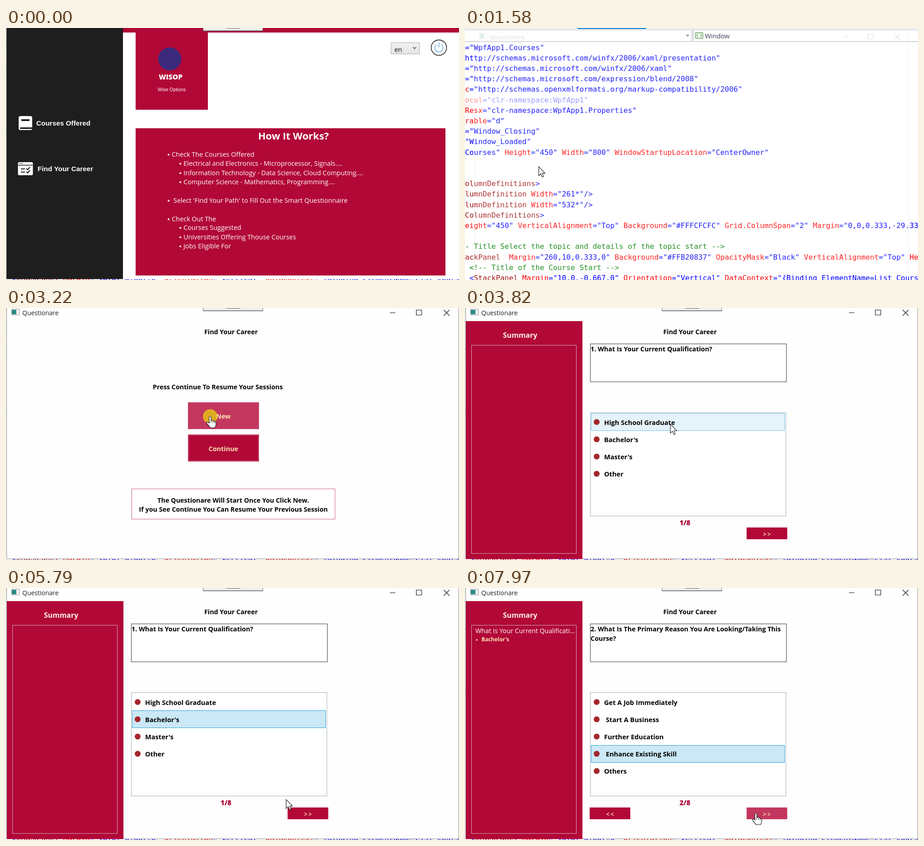
These frames come from a looping animation (1003 by 558 pixels, 8000 ms). An HTML page with a canvas:

```html
<!DOCTYPE html>
<html lang="en">
<head>
<meta charset="utf-8">
<title>Career questionnaire</title>
<style>
html, body { margin: 0; width: 100%; height: 100%; overflow: hidden; background: #fff; }
canvas { display: block; }
</style>
</head>
<body>
<canvas id="stage" width="1003" height="558"></canvas>
<script>
const ctx = document.getElementById('stage').getContext('2d');
const LOOP = 8000;
const RED = '#b20837', HOVER_RED = '#c3375f', WHEAT = '#f9e3b4', INK = '#000';
const SANS = '"Open Sans", "Noto Sans", sans-serif';
const ARIAL = '"Liberation Sans", sans-serif';
const MONO = '"DejaVu Sans Mono", monospace';

// Scene changes
const HOME_END = 1300, OPEN_START = 1520, OPEN_END = 1760, QUIZ_START = 3260;
const PICK_1 = 4800, PAGE_2 = 6210, PICK_2 = 7000;
const CLICKS = [3170, 4440, 6060, 6900], CLICK_MS = 130;

// Pointer path: time, x, y
const PATH = [
  [250, 786, 496], [380, 384, 396], [590, 384, 396], [990, 80, 306], [1450, 80, 306],
  [1580, 163, 307], [2110, 290, 304], [2250, 323, 297], [2510, 452, 240], [3790, 452, 240],
  [3820, 455, 257], [4090, 403, 285], [4410, 403, 285], [4440, 403, 293], [5160, 403, 293],
  [5430, 600, 442], [5760, 600, 442], [5790, 620, 468], [5900, 650, 500], [6490, 650, 500],
  [6850, 480, 362], [7280, 480, 362], [7970, 644, 499]
];

const CODE = [
  '="WpfApp1.Courses"',
  'http://schemas.microsoft.com/winfx/2006/xaml/presentation"',
  '="http://schemas.microsoft.com/winfx/2006/xaml"',
  '="http://schemas.microsoft.com/expression/blend/2008"',
  'c="http://schemas.openxmlformats.org/markup-compatibility/2006"',
  'ocal="clr-namespace:WpfApp1"',
  'Resx="clr-namespace:WpfApp1.Properties"',
  'rable="d"',
  '="Window_Closing"',
  '"Window_Loaded"',
  'Courses" Height="450" Width="800" WindowStartupLocation="CenterOwner"',
  '', '',
  'olumnDefinitions>',
  'lumnDefinition Width="261*"/>',
  'lumnDefinition Width="532*"/>',
  'ColumnDefinitions>',
  'eight="450" VerticalAlignment="Top" Background="#FFFCFCFC" Grid.ColumnSpan="2" Margin="0,0,0.333,-29.333"',
  '',
  '- Title Select the topic and details of the topic start -->',
  'ackPanel  Margin="260,10,0.333,0" Background="#FFB20837" OpacityMask="Black" VerticalAlignment="Top" Height=',
  ' <!-- Title of the Course Start -->',
  ' <StackPanel Margin="10.0.-0.667.0" Orientation="Vertical" DataContext="{Binding ElementName=List_Courses}"'
];
const UNUSED_LINE = 5;

// Baseline, indent, text
const STEPS = [
  [285, 0, 'Check The Courses Offered'],
  [305, 26, 'Electrical and Electronics - Microprocessor, Signals....'],
  [326, 26, 'Information Technology - Data Science, Cloud Computing....'],
  [346, 26, 'Computer Science - Mathematics, Programming....'],
  [387, 0, " Select 'Find Your Path' to Fill Out the Smart Questionnaire"],
  [428, 0, 'Check Out The'],
  [447, 26, 'Courses Suggested'],
  [468, 26, 'Universities Offering Thouse Courses'],
  [488, 26, 'Jobs Eligible For']
];

const QUIZ = [
  { lines: ['1. What Is Your Current Qualification?'],
    options: ['High School Graduate', "Bachelor's", "Master's", 'Other'] },
  { lines: ['2. What Is The Primary Reason You Are Looking/Taking This', 'Course?'],
    options: ['Get A Job Immediately', ' Start A Business', 'Further Education', ' Enhance Existing Skill', 'Others'] }
];

const ARROW = new Path2D('M0 0V20L4.6 15.8L7.8 23.2L10.8 21.8L7.8 14.6H14Z');
const HAND = new Path2D('M-2 1Q0-2 2 1V9Q5 7 6.5 10Q9 8.5 10 11.5Q13 11 13 14V18Q12.5 21 10.5 25H0Q-2 21-7 16Q-9 12-5 12.5L-2 15Z');

function text(str, x, y, size, color, weight = 400, align = 'left', family = SANS) {
  ctx.font = `${weight} ${size}px ${family}`;
  ctx.textAlign = align;
  ctx.fillStyle = color;
  ctx.fillText(str, x, y);
}

function box(x, y, w, h, fill, stroke) {
  if (fill) { ctx.fillStyle = fill; ctx.fillRect(x, y, w, h); }
  if (stroke) {
    ctx.strokeStyle = stroke;
    ctx.lineWidth = 1;
    ctx.strokeRect(x + .5, y + .5, w - 1, h - 1);
  }
}

function dot(x, y, r, color) {
  ctx.fillStyle = color;
  ctx.beginPath();
  ctx.arc(x, y, r, 0, 7);
  ctx.fill();
}

function stroke(d, color, width = 1) {
  ctx.strokeStyle = color;
  ctx.lineWidth = width;
  ctx.stroke(new Path2D(d));
}

function pill(x, y, w, h, r, color) {
  ctx.fillStyle = color;
  ctx.beginPath();
  ctx.roundRect(x, y, w, h, r);
  ctx.fill();
}

const inside = (p, x, y, w, h) => p.x >= x && p.x < x + w && p.y >= y && p.y < y + h;

function pointerAt(t) {
  const i = PATH.findIndex(key => key[0] > t);
  if (i < 0) { const [, x, y] = PATH[PATH.length - 1]; return { x, y }; }
  if (i === 0) return { x: -99, y: -99 };
  const [t0, x0, y0] = PATH[i - 1], [t1, x1, y1] = PATH[i];
  const k = (t - t0) / (t1 - t0);
  return { x: x0 + (x1 - x0) * k, y: y0 + (y1 - y0) * k };
}

function codeLine(line, y) {
  let x = 0;
  const put = (str, color) => {
    text(str, x, y, 16.2, color, 400, 'left', MONO);
    x += ctx.measureText(str).width;
  };
  if (/^\s*(<!)?-/.test(line)) return put(line, '#008000');
  const parts = line.split('"');
  const startsQuoted = parts.length % 2 === 0;
  parts.forEach((part, i) => {
    if (i) put('"', '#00f');
    if ((i % 2 === 1) !== startsQuoted) return put(part, '#00f');
    for (const [token] of part.matchAll(/[\w.]+=?|[^\w.]+/g)) {
      if (token.endsWith('=') && token.length > 1) {
        put(token.slice(0, -1), '#f00');
        put('=', '#00f');
      } else put(token, /\w/.test(token) ? '#a31515' : '#00f');
    }
  });
}

function drawEditor() {
  box(0, 0, 1003, 558, '#fff');
  box(0, 0, 1003, 5, '#eeeef2');
  box(249, 0, 152, 2, '#007acc');
  box(0, 4, 1003, 1, '#cccedb');
  box(0, 29, 1003, 2, '#cccedb');
  box(501, 4, 6, 27, '#d9dae3');
  ctx.fillStyle = '#717171';
  ctx.fill(new Path2D('M489 15H497L493 19Z'));
  stroke('M510.5 10.5H526.5V22.5H510.5ZM516 13.5L513 16.5L516 19.5M521 13.5L524 16.5L521 19.5', '#388a34', 1.4);
  text('Window', 531, 23, 14.6, '#1e1e3c');
  CODE.forEach((line, i) => {
    ctx.globalAlpha = i === UNUSED_LINE ? .45 : 1;
    codeLine(line, 48.5 + i * 23.2);
  });
  ctx.globalAlpha = 1;
}

function drawDebugBar() {
  box(436, -5, 133, 12, '#f0f0f0', '#666');
  box(437, 5, 131, 1, '#999');
  box(488, 0, 31, 1, '#555');
}

function drawHome() {
  box(1, 0, 1002, 556, '#fff');
  box(1, 0, 258, 556, '#1e1e1e');
  box(259, 0, 744, 10, RED);
  box(287, 10, 160, 171, RED);
  dot(362.5, 68.5, 25.5, '#3b2a7c');
  text('WISOP', 364.5, 114, 15.5, '#fff', 800, 'center');
  text('Wise Options', 367, 139.5, 10.4, '#fff', 400, 'center', ARIAL);

  // Book and checklist icons
  pill(28, 195, 30, 31, 4, '#fff');
  box(34, 202, 18, 4, '#1e1e1e');
  pill(31, 220, 28, 3.5, 1.5, '#1e1e1e');
  text('Courses Offered', 67, 216, 15.3, '#fff', 700, 'left', ARIAL);
  pill(26.5, 297, 33, 29, 3, '#fff');
  box(27, 303, 32, 1.5, '#1e1e1e');
  [30, 33, 36].forEach(x => dot(x, 300, 1, '#1e1e1e'));
  stroke('M33 312H42M33 319H42M45 311L48 314L53 308M45 318L48 321L53 315', '#1e1e1e', 2);
  text('Find Your Career', 70, 316.5, 15.3, '#fff', 700, 'left', ARIAL);

  const grey = ctx.createLinearGradient(0, 33, 0, 58);
  grey.addColorStop(0, '#f0f0f0');
  grey.addColorStop(1, '#e5e5e5');
  box(852, 32, 64, 26, grey, '#acacac');
  text('en', 860, 53, 14.4, '#111');
  stroke('M901 42L904.5 46L908 42', '#555', 1.6);
  stroke('M975.5 43.5A17 17 0 1 1 941.5 43.5A17 17 0 1 1 975.5 43.5', '#3c3c3c', 1.8);
  stroke('M953 36.5A9 9 0 1 0 964 36.5M958.5 32V43', '#86bfe6', 2);

  box(287, 222, 686, 326, RED);
  text('How It Works?', 636.5, 247, 22, '#fff', 700, 'center');
  for (const [y, indent, str] of STEPS) {
    dot(360 + indent, y - 4.5, 2, '#fff');
    text(str, 367 + indent, y, 14.45, '#fff');
  }
  drawDebugBar();
}

function drawWindow() {
  box(1, -6, 1002, 562, '#fefefe', '#8a8a8a');
  box(12, 2, 18, 14, '#f4f4f8', '#9a9aa8');
  box(13, 4, 10, 10, '#2a8b86');
  text('Questionare', 36, 16, 14, '#222');
  stroke('M850 10.5H862M908.5 4.5H920.5V15.5H908.5ZM969 4L982 17M982 4L969 17', '#111', 1.1);
}

function bigButton(label, y, hover) {
  box(403, y, 157, 59, hover ? HOVER_RED : RED, RED);
  box(404, y + 1, 155, 57, null, '#cc5a7b');
  text(label, 481.3, y + 36, 14.4, WHEAT, 700, 'center');
}

function drawIntro(p) {
  text('Press Continue To Resume Your Sessions', 325, 179.5, 14.3, INK, 700);
  bigButton('New', 209, inside(p, 403, 209, 157, 59));
  bigButton('Continue', 280.5, false);
  box(278, 400, 451, 68, '#fff', '#cc5f80');
  text('The Questionare Will Start Once You Click New.', 503, 430.5, 14.3, INK, 700, 'center');
  text('If you See Continue You Can Resume Your Previous Session', 503.5, 451, 14.3, INK, 700, 'center');
}

function navButton(label, x, hover) {
  box(x, 486, 90, 26, hover ? HOVER_RED : RED);
  ctx.letterSpacing = '2px';
  text(label, x + 46, 506, 13.5, WHEAT, 600, 'center');
  ctx.letterSpacing = '0px';
}

function drawQuiz(t, p) {
  const page = t < PAGE_2 ? 0 : 1;
  const { lines, options } = QUIZ[page];
  const picked = page ? (t >= PICK_2 ? 3 : -1) : (t >= PICK_1 ? 1 : -1);

  box(2, 29, 258, 527, RED);
  text('Summary', 122, 66, 15.8, '#fbf3e4', 700, 'center');
  box(14, 82, 233, 462, null, '#cfb0ba');
  if (page) {
    text('What Is Your Current Qualificati...', 23, 100, 14.3, '#fff');
    dot(26, 115, 1.8, WHEAT);
    text("Bachelor's", 36.5, 118, 11.8, WHEAT, 700);
  }

  box(277, 79, 435, 85, '#fff', '#3c3038');
  lines.forEach((line, i) => text(line, 278, 96 + i * 20.5, 14.35, INK, 700));

  box(277, 231, 434, 230, '#fff', '#a9acb2');
  options.forEach((option, i) => {
    const y = 233 + i * 38.2, top = Math.round(y);
    if (i === picked) box(279, top, 429, 39, '#cbe8f6', '#26a0da');
    else if (inside(p, 279, y, 429, 38.2)) box(279, top, 429, 39, '#e5f3fb', '#70c0e7');
    dot(291.5, y + 19.5, 6.5, '#a3262c');
    text(option, 308, y + 25.5, 14.6, INK, 700);
  });

  text(`${page + 1}/8`, 487, 480.5, 14.9, RED, 800, 'center');
  if (page) navButton('<<', 276, false);
  const pageJustTurned = t >= PAGE_2 && t < PICK_2;
  navButton('>>', 623.5, inside(p, 623, 486, 90, 26) && !pageJustTurned);
}

function drawPointer(t, p) {
  const click = CLICKS.find(c => t >= c && t < c + CLICK_MS);
  if (click !== undefined) {
    const alpha = .8 - .45 * (t - click) / CLICK_MS;
    dot(p.x, p.y, 16, `rgba(240, 240, 0, ${alpha})`);
  }
  const overButton = t < HOME_END ? inside(p, 20, 290, 180, 40)
    : t < QUIZ_START ? t > OPEN_END && inside(p, 403, 209, 157, 59)
    : inside(p, 623, 486, 90, 26);
  const shape = overButton ? HAND : ARROW;
  ctx.save();
  ctx.translate(p.x, p.y);
  ctx.fillStyle = '#fff';
  ctx.fill(shape);
  ctx.strokeStyle = '#111';
  ctx.lineWidth = 1.1;
  ctx.stroke(shape);
  if (overButton) stroke('M2 9V14M6.2 10V14.5M9.8 12V15.5', '#111');
  ctx.restore();
}

function draw(t) {
  const p = pointerAt(t);
  drawEditor();
  if (t < HOME_END) drawHome();
  else if (t >= OPEN_START) {
    const k = Math.min(1, (t - OPEN_START) / (OPEN_END - OPEN_START));
    const scale = .946 + .054 * k;
    ctx.save();
    ctx.globalAlpha = k ** 1.4;
    ctx.translate(502, 232);
    ctx.scale(scale, scale);
    ctx.translate(-502, -232);
    drawWindow();
    ctx.restore();
    if (k === 1) {
      text('Find Your Career', 439, 58, 14.3, INK, 700);
      if (t < QUIZ_START) drawIntro(p);
      else drawQuiz(t, p);
      drawDebugBar();
    }
  }
  drawPointer(t, p);
}

function tick() {
  draw(performance.now() % LOOP);
  requestAnimationFrame(tick);
}
tick();
</script>
</body>
</html>
```
